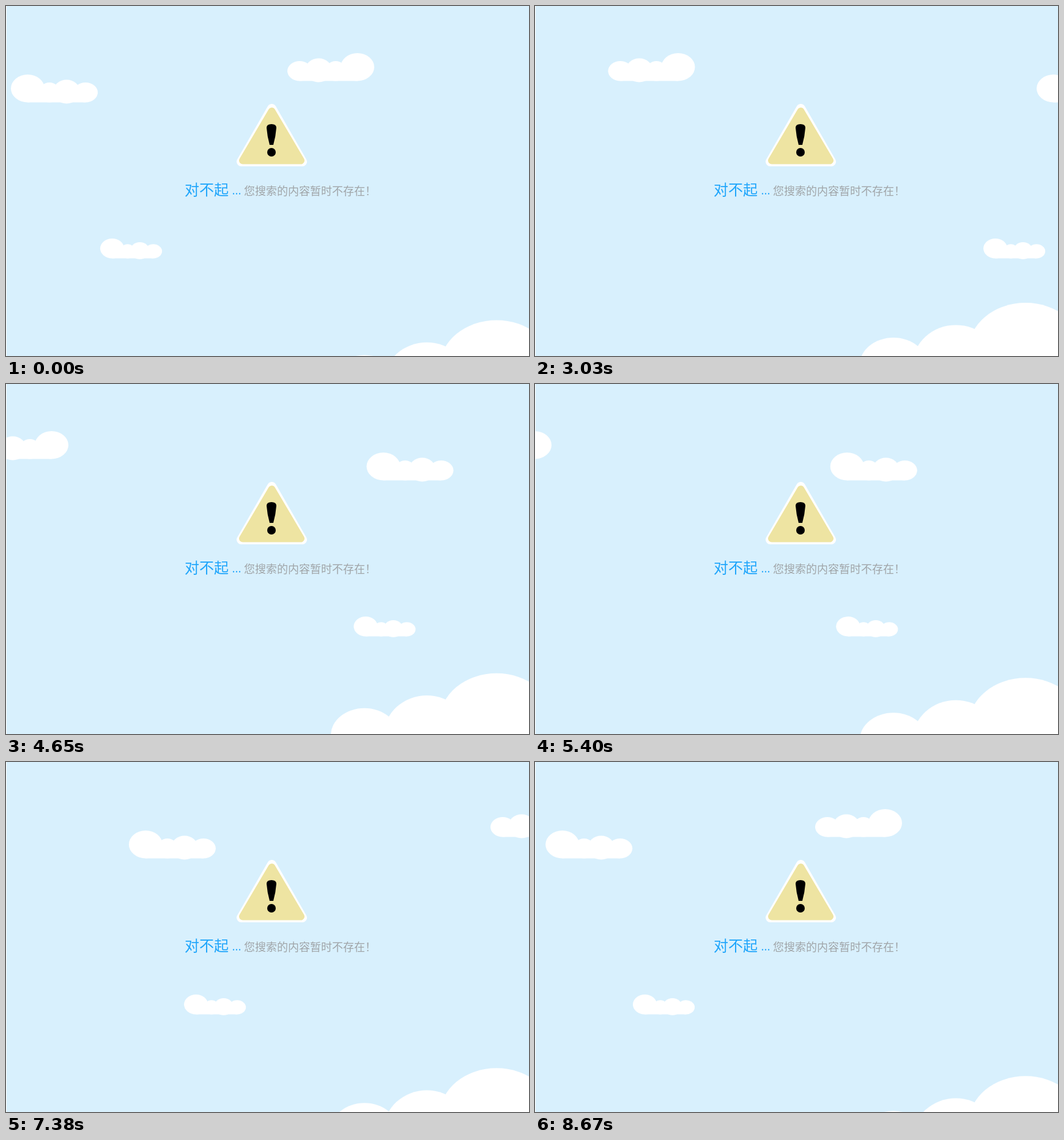
An HTML page that plays this animation: 855x572 px, repeating every 8.7 s.

```html
<!DOCTYPE html>
<html lang="zh-CN">
<head>
<meta charset="utf-8">
<style>
  html, body { margin: 0; width: 100%; height: 100%; overflow: hidden; background: #fff; }
  svg { display: block; width: 855px; height: 572px; }
  text { font-family: "Noto Sans CJK SC", "Noto Sans CJK", sans-serif; font-weight: 300; }
</style>
</head>
<body>
<svg viewBox="0 0 855 572">
  <defs>
    <!-- cloud, 142 x 45.5, big lobe on the left -->
    <g id="cloud">
      <ellipse cx="27.5" cy="22.8" rx="27.5" ry="22.7"/>
      <ellipse cx="63" cy="29.3" rx="17" ry="16.2"/>
      <ellipse cx="91" cy="28" rx="22" ry="19.5"/>
      <ellipse cx="122" cy="29.3" rx="20" ry="16.2"/>
      <rect x="27.5" y="25" width="94.5" height="20.5"/>
    </g>
    <clipPath id="stage"><rect x="1" width="854" height="572"/></clipPath>
  </defs>
  <g clip-path="url(#stage)" fill="#fff">
    <rect width="855" height="572" fill="#d8f0fd"/>
    <g id="hill">
      <ellipse cx="802" cy="77" rx="93" ry="77"/>
      <ellipse cx="688" cy="100.3" rx="70" ry="64"/>
      <ellipse cx="586" cy="101" rx="55" ry="44"/>
    </g>
    <g id="left"><use href="#cloud" y="112"/></g>
    <g id="right"><use href="#cloud" transform="translate(142 77) scale(-1 1)"/></g>
    <g id="low"><use href="#cloud" transform="translate(0 380) scale(.712)"/></g>
  </g>
  <g stroke-linejoin="round">
    <path d="M434.5 167.5L484.5 254.5H384.5Z" fill="#fff" stroke="#fff" stroke-width="15"/>
    <path d="M434.5 172L482 252.5H387Z" fill="#eee4a2" stroke="#eee4a2" stroke-width="12"/>
  </g>
  <path d="M426 199Q426 193 434 193Q442 193 442 199Q441 213 437 227H431Q427 213 426 199Z"/>
  <circle cx="434" cy="239" r="7"/>
  <g fill="#1ea5fb">
    <text x="292" y="308.5" font-size="24">对不起</text>
    <text x="369.5" y="308" font-size="18">...</text>
  </g>
  <text x="389" y="308.5" font-size="18" fill="#a0a5a8">您搜索的内容暂时不存在！</text>
</svg>
<script>
const LOOP = 8700, STEP = 30;

// [time, position] keys with linear travel; equal times make a jump
const tracks = {
  left: [[0, 8], [2040, -144], [2040, 961], [8670, 17.2]],
  right: [[0, 460], [1126, 213.6], [3080, 117], [5700, -145], [5700, 1227], [8670, 458]],
  low: [[0, 154], [1620, -105], [1620, 876.3], [8670, 160]],
  hill: [[0, 513.5], [4500, 471.3], [8670, 513.3]]
};

function valueAt(keys, t) {
  const i = keys.findIndex(k => k[0] > t);
  if (i < 0) return keys[keys.length - 1][1];
  const [t0, a] = keys[i - 1], [t1, b] = keys[i];
  return a + (b - a) * (t - t0) / (t1 - t0);
}

const start = performance.now();
function draw() {
  const now = Math.max(0, performance.now() - start) % LOOP;
  const t = Math.floor(now / STEP) * STEP;
  for (const id in tracks) {
    const v = valueAt(tracks[id], t);
    document.getElementById(id).setAttribute('transform',
      id === 'hill' ? `translate(0 ${v})` : `translate(${v} 0)`);
  }
  requestAnimationFrame(draw);
}
draw();
</script>
</body>
</html>
```
